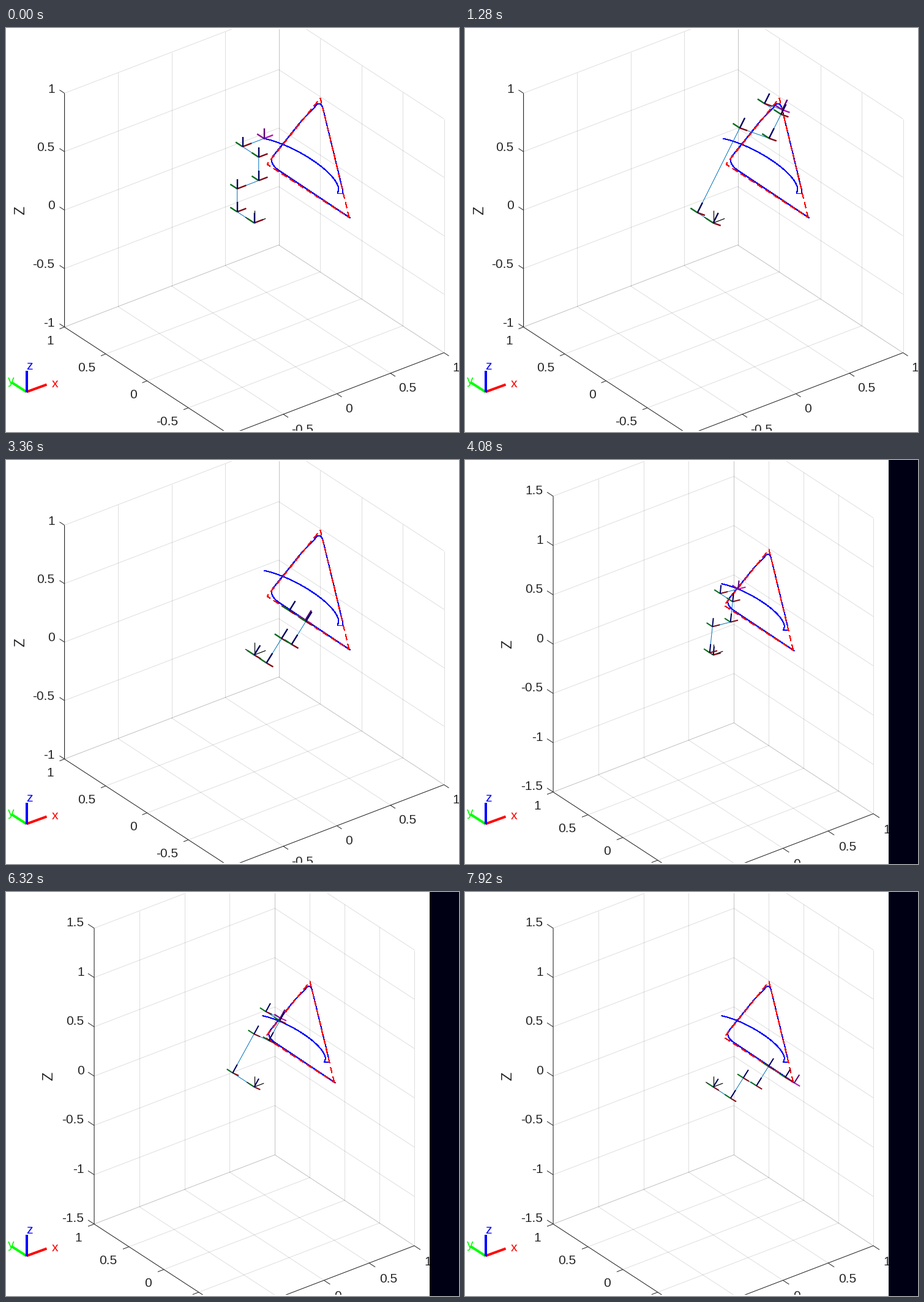
Animation of 740x660 px, one loop 8000 ms. Source, as a matplotlib script:

```python
import numpy as np
import matplotlib.pyplot as plt
from matplotlib.animation import FuncAnimation
from matplotlib.patches import Rectangle

W, H, DPI = 740, 660, 100
CYCLE, FRAMES, STEP = 50, 100, 80
PX = 72 / DPI
INK = (0.15, 0.15, 0.15)
FONT = "Liberation Sans"

# Screen vectors of one unit along x, y and z
BASE = np.array([405.0, 318.0])
UX, UY, UZ = np.array([[175, -67], [-135, -88], [0, -191]], float)


def bezier(*points, n=30):
    """Evaluate a Bezier curve of any degree by repeated interpolation."""
    t = np.linspace(0, 1, n)[:, None]
    levels = [np.array(p, float) + 0 * t for p in points]
    while len(levels) > 1:
        levels = [a + (b - a) * t for a, b in zip(levels, levels[1:])]
    return levels[0]


# Approach arc with a small hook, then a triangle with rounded corners
approach = np.vstack([bezier((421, 180), (472, 191), (541, 236), (543, 263)),
                      [(541, 270), (550, 270)]])
TRACE = np.vstack([approach,
                   (549.5, 264),
                   bezier((517, 130), (512, 116), (503, 130)),
                   (484, 149),
                   bezier((438, 206), (426, 218), (445, 232)),
                   (562, 310)])
TRIANGLE = np.array([(560, 309), (513, 114), (426, 222), (560, 309)], float)
ARC = np.r_[0, np.cumsum(np.hypot(*np.diff(TRACE, axis=0).T))]

apex = TRACE[:, 1].argmin()
corner = apex + TRACE[apex:, 0].argmin()
LEG_ENDS = ARC[[0, len(approach) - 1, apex, corner, -1]]
LEG_TIMES = [0, 5, 17, 34.5, 49]
LEG_PACE = [1, 1, 1, 1.2]

fig = plt.figure(figsize=(W / DPI, H / DPI), dpi=DPI, facecolor="white")
ax = fig.add_axes([0, 0, 1, 1])
ax.set(xlim=(-0.5, W - 0.5), ylim=(H - 0.5, -0.5))
ax.axis("off")


def line(points, color, width=1.0, **kw):
    x, y = np.transpose(points)
    kw.setdefault("solid_capstyle", "butt")
    return ax.plot(x, y, color=color, lw=width * PX, **kw)[0]


def label(x, y, text, size=21, color=INK, ha="left"):
    return ax.text(x, y, text, family=FONT, fontsize=size * PX, color=color,
                   ha=ha, va="baseline", zorder=4)


def build_view(scale, ztop, tick, z_off, y_off, x_off, z_name):
    art = []

    def at(x, y, z):
        return BASE + scale * (x * UX + y * UY + z * UZ)

    def grid(a, b):
        art.append(line([at(*a), at(*b)], INK, alpha=0.15, zorder=1))

    ticks = np.arange(-1, 1.01, 0.5)
    zticks = np.arange(-ztop, ztop + 0.01, 0.5)
    for t in ticks:
        grid((t, 1, -ztop), (t, 1, ztop))
        grid((t, 1, -ztop), (t, -1, -ztop))
        grid((1, t, -ztop), (1, t, ztop))
        grid((1, t, -ztop), (-1, t, -ztop))
    for z in zticks:
        grid((-1, 1, z), (1, 1, z))
        grid((1, 1, z), (1, -1, z))

    edge = [at(-1, 1, ztop), at(-1, 1, -ztop), at(-1, -1, -ztop), at(1, -1, -ztop)]
    art.append(line(edge, INK, zorder=2))

    def mark(p, direction, offset, value, ha):
        art.append(line([p, p + direction], INK, zorder=2))
        x, y = p + offset
        if x < W and y < H + 12:
            art.append(label(x, y + 7, f"{value:g}", ha=ha))

    dy = np.array([-tick, -0.65 * tick])
    dx = np.array([-tick, 0.38 * tick])
    for z in zticks:
        mark(at(-1, 1, z), dy, z_off, z, "right")
    for t in ticks:
        mark(at(-1, t, -ztop), dx, y_off, t, "right")
        mark(at(t, -1, -ztop), -dy, x_off, t, "left")
    art.append(ax.text(*z_name, "Z", family=FONT, fontsize=23 * PX, color=INK,
                       rotation=90, ha="center", va="center"))

    art.append(line(BASE + scale * (TRACE - BASE), "blue", zorder=2.5, antialiased=False))
    art.append(line(BASE + scale * (TRIANGLE - BASE), "red", zorder=2.6, antialiased=False,
                    dashes=(10, 6), dash_capstyle="butt"))
    return art


near = build_view(1.0, 1.0, 8, (-16, -8), (-17, 21.5), (13.5, 23.5), (23, 297))
far = build_view(0.8435, 1.5, 10, (-16.5, -10), (-20, 21.5), (16.5, 25), (69.5, 300))
far.append(ax.add_patch(Rectangle((691.5, -1), W, H + 2, color=(0, 0, 0.08), lw=0, zorder=9)))
for top in (-0.5, 657.5):
    ax.add_patch(Rectangle((-1, top), W + 2, 2, color="white", lw=0, zorder=8))

# Orientation triad in the corner
for tip, color in (((8, 578), "lime"), ((66, 582), "red"), ((33, 559), "blue")):
    line([(33, 594), tip], color, 4, zorder=3)
label(74, 586.5, "x", color="red")
label(2, 582, "y", color="lime")
label(32.5, 557.5, "z", color="blue")

# Robot: links, a triad at each joint, and the fixed world triad
JOINT_COLORS = [(0.5, 0.03, 0.08), (0, 0.42, 0.1), (0, 0, 0.38)]
TOOL_COLORS = [(0.72, 0.08, 0.68), (0.55, 0.05, 0.55), (0.36, 0, 0.48)]


def triad_lines(colors, width, zorder):
    return [line([BASE, BASE], c, width, zorder=zorder) for c in colors]


links = line([BASE, BASE], (0, 0.447, 0.741), zorder=5)
joints = [triad_lines(JOINT_COLORS, 2.4, 6) for _ in range(6)]
joints.append(triad_lines(TOOL_COLORS, 2.4, 5.8))
world = triad_lines(["black"] * 3, 1.2, 5.5)


def smooth(t, start, end):
    u = np.clip((t - start) / (end - start), 0, 1)
    return u * u * (3 - 2 * u)


def bump(t, center, width):
    return np.exp(-0.5 * ((t - center) / width) ** 2)


def tool_point(t):
    leg = min(np.searchsorted(LEG_TIMES, t, side="right"), len(LEG_PACE)) - 1
    u = (t - LEG_TIMES[leg]) / (LEG_TIMES[leg + 1] - LEG_TIMES[leg])
    s = LEG_ENDS[leg] + (LEG_ENDS[leg + 1] - LEG_ENDS[leg]) * u ** LEG_PACE[leg]
    return np.array([np.interp(s, ARC, axis) for axis in TRACE.T])


def pose(t):
    final = smooth(t, 42, 49)
    tilt = np.radians(34 * min(t / 5, 1) + 8 * smooth(t, 16, 46))
    reach = 0.2 + 0.13 * bump(t, 16.5, 5) - 0.075 * bump(t, 42, 3)
    side = 0.2 - 0.25 * bump(t, 5, 1.8) - 0.44 * final
    tool = 0.2 - 0.065 * final
    c, s = np.cos(tilt), np.sin(tilt)
    vx, vz = c * UX - s * UZ, s * UX + c * UZ
    # The two sliding joints are solved so that the tool sits on its trace
    fixed = (reach + tool) * vx + 0.2 * vz + side * UY
    slide, lift = np.linalg.solve(np.column_stack([UY, vz]), tool_point(t) - BASE - fixed)
    steps = [0 * UX, slide * UY, lift * vz, reach * vx, 0.2 * vz, side * UY, tool * vx]
    return BASE + np.cumsum(steps, axis=0), (vx, UY, vz)


def set_triad(triad, origin, vectors, length):
    for artist, v in zip(triad, vectors):
        artist.set_data(*np.transpose([origin, origin + length * v]))


def update(i):
    second = i >= CYCLE
    scale = 0.8435 if second else 1.0
    for art, shown in ((near, not second), (far, second)):
        for a in art:
            a.set_visible(shown)
    points, vectors = pose(i % CYCLE)
    points = BASE + scale * (points - BASE)
    links.set_data(*points.T)
    for origin, triad in zip(points, joints):
        set_triad(triad, origin, vectors, 0.084 * scale)
        for artist in triad:
            artist.set_linewidth((2.0 if second else 2.4) * PX)
    set_triad(world, BASE, (UX, UY, UZ), 0.107 * scale)
    return []


anim = FuncAnimation(fig, update, frames=FRAMES, interval=STEP, repeat=True,
                     repeat_delay=0, blit=False, cache_frame_data=False)
plt.show()
```
